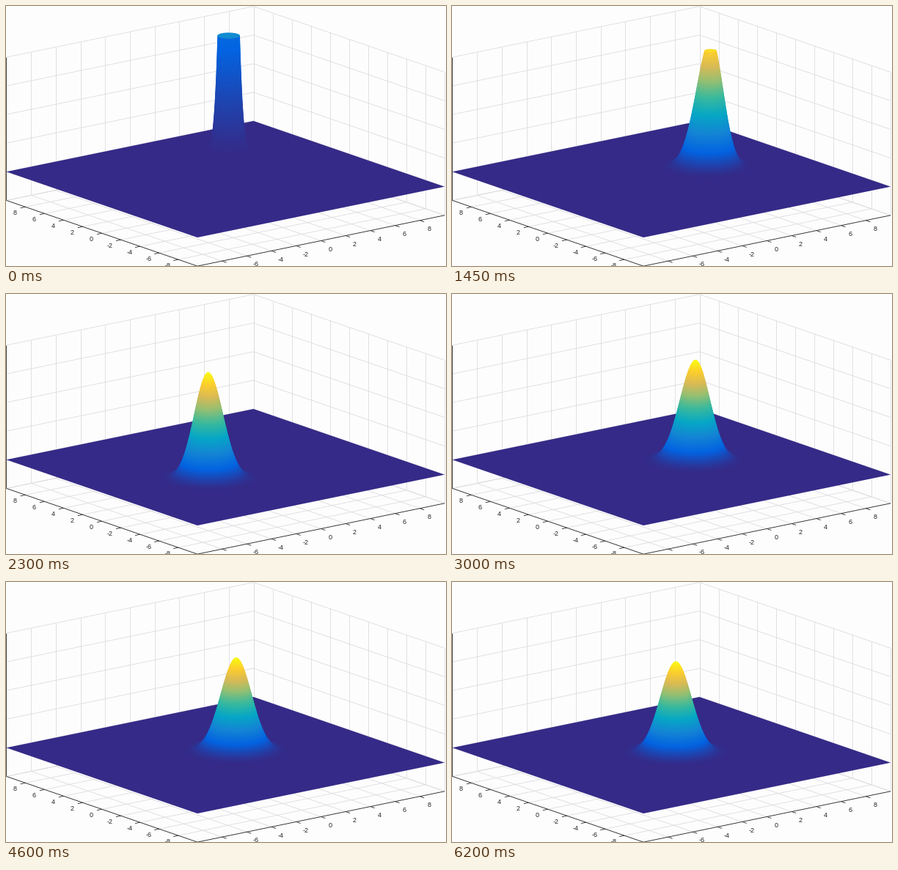
Animation, 600 px wide and 355 px high, one loop 6.25 s. Source, as a matplotlib script:

```python
import numpy as np
import matplotlib.pyplot as plt
from matplotlib.animation import FuncAnimation
from matplotlib.collections import LineCollection, PolyCollection
from matplotlib.colors import LinearSegmentedColormap

plt.rcParams["font.family"] = "Liberation Sans"

W, H, DPI = 600, 355, 100
FRAMES, STEP = 125, 50
LIM = 10                        # the plane spans -LIM..LIM both ways
UNIT = np.array([21.3, -5.67])  # pixels per unit across and into the view
ORIGIN = np.array([299.25, 236.5])
TURN = np.radians(37.7)         # azimuth of the view
Z_STEP = 39.1                   # pixels between two z grid lines
Z_MAX = 4 * Z_STEP              # the surface is cut off here
FACET = .075                    # half a mesh cell, shifts the flat shading
DARK, GRID = "#262626", "#dcdcdf"

cmap = LinearSegmentedColormap.from_list(
    "heat", "#352a87 #0363e1 #1485d4 #06a7c6 #38b99e "
            "#92bf73 #d9ba56 #fcce2e #f9fb0e".split(), N=512)


def project(x, y, z=0):
    """Orthographic view of the box; z is counted in grid steps."""
    across = x * np.cos(TURN) - y * np.sin(TURN)
    depth = x * np.sin(TURN) + y * np.cos(TURN)
    return ORIGIN + UNIT * (across, depth) - (0, Z_STEP * z)


fig = plt.figure(figsize=(W / DPI, H / DPI), dpi=DPI, facecolor="#fdfdfe")
ax = fig.add_axes([0, 0, 1, 1])
ax.set_xlim(0, W)
ax.set_ylim(H, 0)
ax.axis("off")


def lines(segments, color, zorder):
    ends = [[project(*a), project(*b)] for a, b in segments]
    ax.add_collection(LineCollection(ends, colors=color, linewidths=.6,
                                     zorder=zorder))


def label(k, point, dx, dy):
    ax.text(point[0] + dx, point[1] + dy, str(k), fontsize=9 * 72 / DPI,
            color=DARK, ha="center", va="center_baseline", zorder=4)


def draw_box():
    left, front, right, back = (-LIM, LIM), (-LIM, -LIM), (LIM, -LIM), (LIM, LIM)
    grid = []
    for k in range(-LIM, LIM + 1, 2):
        grid += [((k, LIM, -1), (k, LIM, 4)), ((LIM, k, -1), (LIM, k, 4)),
                 ((k, -LIM, -1), (k, LIM, -1)), ((-LIM, k, -1), (LIM, k, -1))]
    for z in range(-1, 5):
        grid += [((*left, z), (*back, z)), ((*back, z), (*right, z))]
    lines(grid, GRID, 1)

    plane = [project(*corner) for corner in (left, front, right, back)]
    ax.add_patch(plt.Polygon(plane, fc=cmap(0.), ec="none", zorder=2))

    axes = [((*left, -1), (*left, 4)), ((*left, -1), (*front, -1)),
            ((*front, -1), (*right, -1))]
    for k in range(2 - LIM, LIM, 2):
        axes += [((-LIM, k, -1), (-LIM - .4, k, -1)),
                 ((k, -LIM, -1), (k, -LIM - .45, -1))]
        label(k, project(-LIM, k, -1), -14.7, 7.5)
        label(k, project(k, -LIM, -1), 12.3, 10.7)
    lines(axes, DARK, 3)


draw_box()
hill = PolyCollection([], edgecolors="none", zorder=5)
ax.add_collection(hill)

PHI = np.linspace(0, 2 * np.pi, 56, endpoint=False)
CIRCLE = np.column_stack([np.cos(PHI), np.sin(PHI)])
LEVELS = 170


def update(i):
    t = i * STEP / 1000
    # the peak spirals inward while it spreads to its resting width
    radius = 7.25 * np.exp(-.365 * t)
    theta = np.radians(79.3 + 230.4 * t + 9 * np.exp(-t / .25))
    spread = 1 - np.exp(-.72 * (t + .24))
    peak, sigma = 123 / spread, 1.01 * np.sqrt(spread)
    lean = min(.35, .01 * radius ** 2)

    # the hill is a stack of discs, its tail leaning toward the centre
    z = np.linspace(.006 * peak, min(peak * .9995, Z_MAX), LEVELS)
    rho = sigma * np.sqrt(2 * np.log(peak / z))
    heading = np.array([np.cos(theta), np.sin(theta)])
    centre = (radius - lean * rho)[:, None] * heading
    verts = ORIGIN + UNIT * (centre[:, None] + rho[:, None, None] * CIRCLE)
    verts[:, :, 1] -= z[:, None]

    # front facets take the colour of their outer edge, the cut shows the inside
    shift = np.full(LEVELS, FACET)
    if peak > Z_MAX:
        shift[-1] = -FACET
    shade = np.maximum(rho + shift * np.minimum(1, rho / sigma), 0) / sigma
    hill.set_verts(verts)
    hill.set_facecolor(cmap(np.exp(-shade ** 2 / 2)))
    return hill,


anim = FuncAnimation(fig, update, frames=FRAMES, interval=STEP,
                     repeat=True, repeat_delay=0, blit=False)
plt.show()
```
